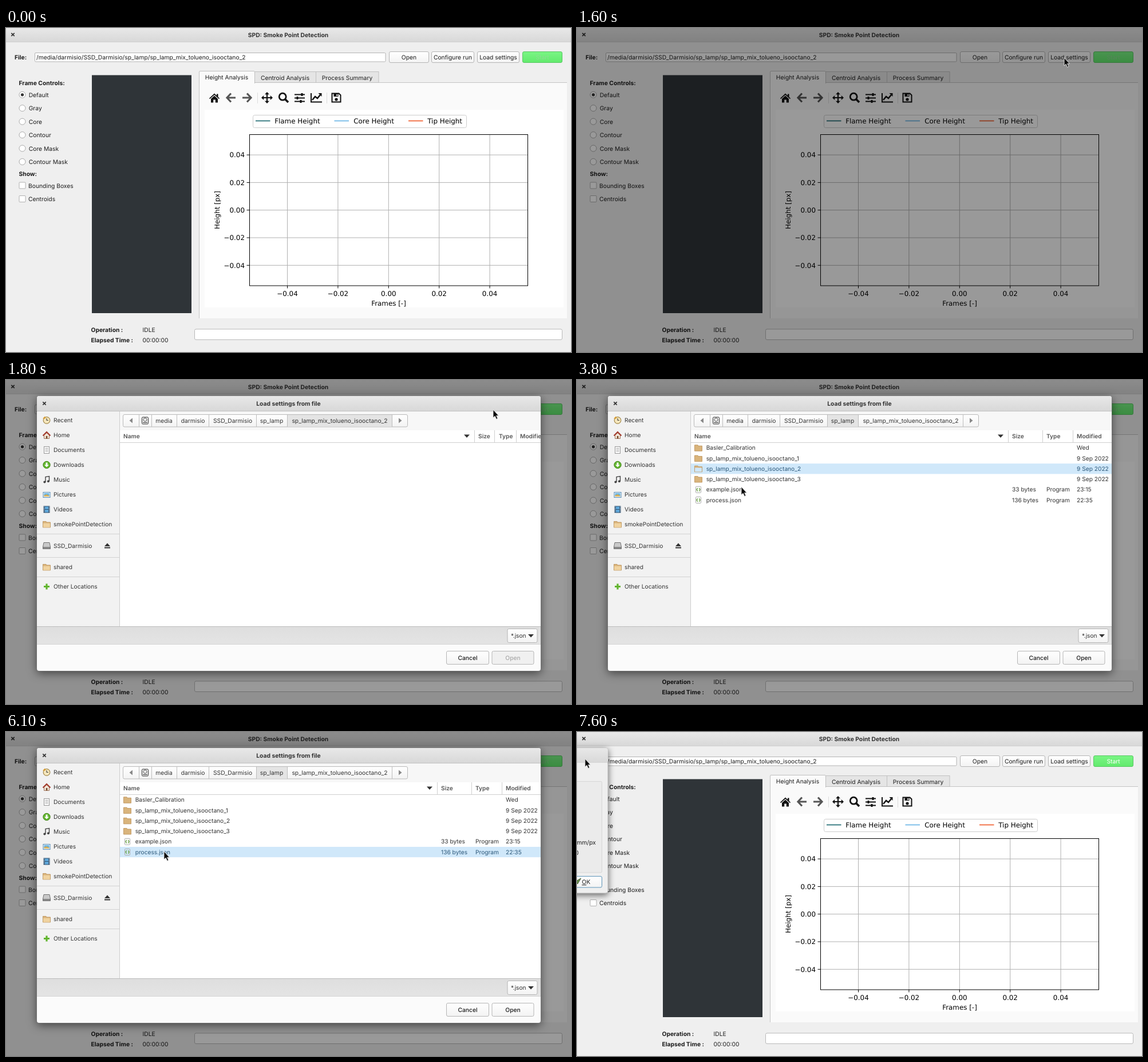
These frames come from a looping animation (987 px wide and 567 px high, 8000 ms). An HTML page:

```html
<!DOCTYPE html>
<html lang="en">
<head>
<meta charset="utf-8">
<title>SPD: Smoke Point Detection</title>
<style>
  html, body { margin: 0; width: 100%; height: 100%; overflow: hidden; background: #efefef; }
  svg { display: block; }
  text { font-family: Inter, sans-serif; white-space: pre; text-rendering: geometricPrecision; }
  .plot text { font-family: "DejaVu Sans", sans-serif; }
  .row rect { fill: none; }
  .row.sel rect { fill: #d0e8fa; }
  .row.sel text { fill: #2c587a; }
</style>
</head>
<body>
<svg id="stage" width="987" height="567" viewBox="0 0 987 567"></svg>
<script>
const LOOP = 8000, STEP = 100;
const INK = '#1c1c1c', SOFT = '#333';

// ---- drawing helpers (text y is the middle of the capitals) ----
const rect = (x, y, w, h, fill, stroke = 'none', r = 0, extra = '') =>
  `<rect x="${x}" y="${y}" width="${w}" height="${h}" rx="${r}" fill="${fill}" stroke="${stroke}" ${extra}/>`;
const path = (d, fill, stroke = 'none', width = 1, extra = '') =>
  `<path d="${d}" fill="${fill}" stroke="${stroke}" stroke-width="${width}" ${extra}/>`;
const line = (d, stroke, width = 1, extra = '') => path(d, 'none', stroke, width, extra);
const circle = (x, y, r, fill, stroke = 'none', width = 1) =>
  `<circle cx="${x}" cy="${y}" r="${r}" fill="${fill}" stroke="${stroke}" stroke-width="${width}"/>`;
const text = (s, x, y, { size = 10.3, weight = 400, fill = INK, anchor = 'start', extra = '' } = {}) =>
  `<text x="${x}" y="${y + size * .36}" font-size="${size}" font-weight="${weight}" fill="${fill}" text-anchor="${anchor}" ${extra}>${s}</text>`;
const bold = (s, x, y, opt) => text(s, x, y, { weight: 700, ...opt });
const group = (id, body, extra = '') => `<g id="${id}" ${extra}>${body}</g>`;
const at = (x, y, body) => `<g transform="translate(${x} ${y})">${body}</g>`;
const cross = (x, y) => line(`M${x - 2.7} ${y - 2.7}l5.4 5.4m0 -5.4l-5.4 5.4`, '#333', 1.7);
const button = (label, x, y, w, h, { id = '', fill = 'url(#face)', stroke = '#b5b5b5', ...opt } = {}) =>
  rect(x + .5, y + .5, w - 1, h - 1, fill, stroke, 2.5, id && `id="${id}"`) +
  text(label, x + w / 2, y + h / 2, { anchor: 'middle', ...opt });
const gradient = (id, from, to) =>
  `<linearGradient id="${id}" x2="0" y2="1"><stop stop-color="${from}"/><stop offset="1" stop-color="${to}"/></linearGradient>`;

// ---- main window ----
const toolIcons = () =>
  at(364, 122.5, path('M-9 .5L0-8L4-4.2V-7H6.5V-2L9 .5L8 1.8L0-5.5L-8 1.8Z', '#111') +
    path('M-6 1.5L0-4L6 1.5V8H1.8V3H-1.8V8H-6Z', '#111')) +
  at(393, 122, line('M8 0H-6M0-7.5L-7 0L0 7.5', '#555', 3.2)) +
  at(421, 122, line('M-8 0H6M0-7.5L7 0L0 7.5', '#555', 3.2)) +
  line('M439.5 113v19M560.5 113v19', '#dcdcdc') +
  at(456, 122, line('M-7 0H7M0-7V7', '#111', 2.2) +
    path('M0-10l4 4.2h-8ZM0 10l4-4.2h-8ZM-10 0l4.2-4v8ZM10 0l-4.2-4v8Z', '#111')) +
  at(484, 121, circle(-.8, -.8, 6, 'none', '#111', 2.8) + line('M3.5 3.5L9 9', '#111', 3.6)) +
  at(513, 122, line('M-9-5.5H9M-9 .5H9M-9 6.5H9', '#111', 1.8) +
    line('M4-8v5M-4-2v5M2 4v5', '#111', 3)) +
  at(542, 122, line('M-9-8V7.5H10', '#111', 2) + line('M-7 4L-2-2L2 1L7-5', '#111', 2.5) +
    path('M3.5-8H9.5V-2Z', '#111')) +
  at(577, 122, line('M-7.5-7.5H4.5L7.5-4.5V7.5H-7.5Z', '#111', 2) +
    path('M-4.5-7H3.5V-2H-4.5Z', '#111') + rect(.3, -6, 2, 3, '#fafafa') + circle(0, 3, 2.6, '#111'));

function plot() {
  const ticks = ['−0.04', '−0.02', '0.00', '0.02', '0.04'], size = 11.9;
  let s = rect(347, 143, 627, 346, '#fff') + rect(431.5, 152.5, 373, 22, '#fff', '#ccc', 3);
  [['Flame Height', 436, 470, '#1f6b72'], ['Core Height', 573.5, 608, '#6cb6e6'], ['Tip Height', 703, 737, '#f05f30']]
    .forEach(([name, x, tx, color]) => {
      s += line(`M${x} 162.5h25.5`, color, 1.7) + text(name, tx - .8, 162.5, { size, fill: '#000' });
    });
  ticks.forEach((label, i) => {
    const x = 491.5 + i * 88.4, y = 415.3 - i * 48.3;
    s += line(`M${x} 186V451M425 ${y}H912`, '#b0b0b0') + line(`M${x} 451v4.5M425 ${y}h-4.5`, '#000') +
      text(label, x, 464.5, { size, fill: '#000', anchor: 'middle' }) +
      text(label, 417, y, { size, fill: '#000', anchor: 'end' });
  });
  s += rect(425.5, 186.5, 486, 264.5, 'none', '#000') +
    text('Frames [-]', 668.5, 482, { size, fill: '#000', anchor: 'middle' }) +
    text('Height [px]', 0, 0, { size, fill: '#000', anchor: 'middle', extra: 'transform="translate(368.5 318.5) rotate(-90)"' });
  return `<g class="plot">${s}</g>`;
}

function mainWindow() {
  let s = rect(0, 0, 987, 567, '#efefef') + rect(0, 0, 987, 24, 'url(#bar)') + line('M0 24.5H987', '#d0d0d0') +
    cross(12, 11.5) + bold('SPD: Smoke Point Detection', 493, 12, { fill: '#333', anchor: 'middle' }) +
    bold('File:', 15, 51) + rect(50.5, 43.5, 612.5, 15.5, '#fff', '#b3b3b3', 1.5) +
    text('/media/darmisio/SSD_Darmisio/sp_lamp/sp_lamp_mix_tolueno_isooctano_2', 53, 51) +
    button('Open', 669, 41, 70, 20) + button('Configure run', 743, 41, 75, 20) +
    button('Load settings', 823, 41, 74, 20, { id: 'load' }) +
    button('Start', 902, 41, 70, 20, { fill: 'url(#green)', stroke: '#58c763', extra: 'id="start"' }) +
    rect(150, 82.5, 174, 416.5, '#2f3438') +
    bold('Frame Controls:', 22.5, 96.5) + bold('Show:', 22.5, 255.5);
  ['Default', 'Gray', 'Core', 'Contour', 'Core Mask', 'Contour Mask'].forEach((name, i) => {
    const y = 116.8 + i * 23.45;
    s += circle(28.5, y, 5.5, '#fff', '#a8a8a8') + text(name, 39.7, y + .3);
    if (!i) s += circle(28.5, y, 2.6, '#333');
  });
  ['Bounding Boxes', 'Centroids'].forEach((name, i) => {
    const y = 275.5 + i * 23.5;
    s += rect(23, y - 5.5, 11, 11, '#fff', '#b0b0b0', 1) + text(name, 39, y + .3);
  });
  s += rect(337.5, 95.5, 642.5, 412.5, '#fafafa') + line('M337.5 508V95.5H980', '#c4c4c4') +
    rect(434.5, 76.5, 107, 19, '#e5e5e5', '#c0c0c0') + rect(541.5, 76.5, 109.5, 19, '#e5e5e5', '#c0c0c0') +
    path('M337.5 97V77Q337.5 75.5 339 75.5H433Q434.5 75.5 434.5 77V97', '#fafafa', '#c0c0c0') +
    text('Height Analysis', 385.5, 86, { anchor: 'middle' }) +
    text('Centroid Analysis', 487.5, 87, { anchor: 'middle' }) +
    text('Process Summary', 596, 87, { anchor: 'middle' }) + toolIcons() + plot() +
    bold('Operation :', 148.5, 528) + text('IDLE', 238.5, 528) +
    bold('Elapsed Time :', 148.5, 546) + text('00:00:00', 238.5, 546) +
    rect(329.5, 527, 642, 18.5, '#fff', '#b8b8b8', 2.5);
  return s;
}

// ---- file dialog ----
const folder = path('M-6.5-5H-1L0-3.5H6.5V5.5H-6.5Z', '#d9b47c', '#b98f55', .8) + rect(-6, -1.8, 12, 7, '#f0d3a0');
const drive = path('M-5-5.5H5L6.5 2V5.5H-6.5V2Z', '#c9c9c9', '#666', .9) + rect(-6, 2, 12, 3.4, '#888');
const places = [
  ['Recent', 70.5, circle(0, 0, 5.8, '#f6e7bd', '#a58a4a', 1.2) + line('M0-3.5V0H3', '#444', 1.1) + path('M-7-3l4-4l1 4Z', '#d99a2b')],
  ['Home', 96.5, path('M-4.5 0V6H4.5V0L0-4Z', '#f1e6d8', '#8c5a3c', .8) + line('M-6.5 1L0-5.5L6.5 1', '#a3392b', 2) + rect(-1.2, 1.5, 2.6, 4.5, '#7a4a2c')],
  ['Documents', 122.5, rect(-4.5, -6, 9, 12, '#f7f7f7', '#999') + line('M-2.5-3h5M-2.5-.5h5M-2.5 2h5', '#aaa')],
  ['Downloads', 148.5, circle(0, 0, 6.2, '#62b52f', '#46881f') + path('M-1.5-4h3V0H4L0 4L-4 0H-1.5Z', '#fff')],
  ['Music', 174.5, line('M-2 4V-5L4.5-6V2.5', '#444', 1.4) + circle(-3.6, 4, 2, '#444') + circle(2.9, 2.8, 2, '#444')],
  ['Pictures', 200.5, rect(-6, -4, 12, 9, '#fff', '#4c86b4') + rect(-4.5, -2.5, 9, 6, '#64b0e0') + path('M-4.5 3.5V1L0-.5L4.5 2V3.5Z', '#d6b25e')],
  ['Videos', 226.5, rect(-5.5, -6, 11, 12, '#2d4f6e') + rect(-3, -5, 6, 4.5, '#5fa9dc') + rect(-3, .5, 6, 4.5, '#5fa9dc') + line('M-4.3-5V6M4.3-5V6', '#cfe0ee', 1.1, 'stroke-dasharray="1.3 1.3"')],
  ['smokePointDetection', 252.5, folder],
  ['SSD_Darmisio', 290, drive],
  ['shared', 327.5, folder],
  ['Other Locations', 361.5, line('M0-5V5M-5 0H5', '#62b52f', 3.2)],
];
const files = [
  ['Basler_Calibration', '', 'Wed'],
  ['sp_lamp_mix_tolueno_isooctano_1', '', '9 Sep 2022'],
  ['sp_lamp_mix_tolueno_isooctano_2', '', '9 Sep 2022'],
  ['sp_lamp_mix_tolueno_isooctano_3', '', '9 Sep 2022'],
  ['example.json', '33 bytes', '23:15'],
  ['process.json', '136 bytes', '22:35'],
];
const jsonIcon = rect(-4.5, -5.5, 9, 11, '#f6f6f6', '#a9a9a9', 1) +
  line('M-1-2.5Q-2.5-2.5-2.2-.8L-3 0L-2.2 .8Q-2.5 2.5-1 2.5M1-2.5Q2.5-2.5 2.2-.8L3 0L2.2 .8Q2.5 2.5 1 2.5', '#5d9a33', 1.2);
const down = (x, y) => path(`M${x - 5} ${y - 2.5}h10l-5 5.5Z`, '#333');

const header = (arrow, columns) =>
  down(arrow, 98) + columns.map(([name, edge, x]) =>
    line(`M${edge}.5 88V109`, '#cfcfcf') + text(name, x, 98.5, { size: 10.2, weight: 600, fill: '#555' })).join('');

const fileRow = ([name, bytes, when], i) => {
  const y = 118.8 + i * 18.25, opt = { size: 10.2, fill: SOFT };
  return `<g class="row">${rect(199, y - 9.1, 735, 18.25, 'none')}${at(212, y, bytes ? jsonIcon : folder)}` +
    text(name, 225.7, y, opt) + text(bytes, 760, y, opt) +
    text(bytes && 'Program', 820, y, opt) + text(when, 873, y, opt) + '</g>';
};

function dialog() {
  const opt = { size: 10.2, fill: SOFT };
  let s = rect(54, 28, 880, 481, '#fbfbfb', 'none', 4) +
    path('M54 54V32Q54 28 58 28H930Q934 28 934 32V54Z', 'url(#bar)') + line('M54 54.5H934', '#c2c2c2') +
    cross(67, 41) + bold('Load settings from file', 493.5, 41.5, { fill: '#333', anchor: 'middle' }) +
    rect(54, 55, 144, 376, '#f2f2f2') + line('M198.5 55V431', '#cdcdcd') +
    line('M54 269.5H198M54 310.5H198M54 344.5H198', '#d2d2d2') +
    path('M177 285.5l5 5.5h-10ZM172 292.5h10v2h-10Z', '#333');
  places.forEach(([name, y, icon]) => s += at(71, y, icon) + text(name, 83, y, opt));
  s += rect(199, 55, 735, 33, '#f7f7f7') + rect(204.5, 60.5, 497, 21.5, 'url(#face)', '#b9b9b9', 2.5) +
    rect(491, 61, 183.5, 20.5, '#e4e4e4', 'none', 0, 'id="crumbChild"') +
    rect(437, 61, 54, 20.5, '#e4e4e4', 'none', 0, 'id="crumbParent"') +
    [232, 254, 298, 354, 437, 491, 674].map(x => line(`M${x}.5 61V82`, '#bdbdbd')).join('') +
    path('M221 66.5v9l-5.5-4.5ZM686 66.5v9l5.5-4.5Z', '#888') +
    at(243, 71, rect(-5.5, -6, 11, 12, '#eee', '#333', 1.5) + circle(0, -1.5, 3, 'none', '#555') + line('M-4 3.5H4', '#333'));
  [['media', 276], ['darmisio', 326.5], ['SSD_Darmisio', 396], ['sp_lamp', 464], ['sp_lamp_mix_tolueno_isooctano_2', 583]]
    .forEach(([name, x]) => s += text(name, x, 71, { size: 10.3, fill: SOFT, anchor: 'middle' }));
  s += rect(199, 88, 735, 343, '#fff') + line('M199 109.5H934', '#cfcfcf') +
    text('Name', 205, 98.5, { size: 10.2, weight: 600, fill: '#555' }) +
    group('emptyList', header(805, [['Size', 818, 825], ['Type', 853, 861], ['Modified', 891, 898]])) +
    group('fullList', header(740, [['Size', 753, 760], ['Type', 813, 820], ['Modified', 866, 873]]) + files.map(fileRow).join('')) +
    rect(54, 431, 880, 31, 'url(#tray)') + line('M54 431.5H934', '#bcbcbc') + line('M54 462.5H934', '#d4d4d4') +
    rect(876, 435.5, 52, 24, 'url(#face)', '#b5b5b5', 2.5) + text('*.json', 882, 447.5, opt) + down(917, 447.5) +
    button('Cancel', 769, 474, 75, 24, { weight: 500, fill: 'url(#face)' }) +
    button('Open', 848.5, 474, 74, 24, { weight: 500, id: 'openFace', extra: 'id="openText"' });
  return rect(54, 28, 880, 481, '#ddd', '#777', 4, 'style="filter:drop-shadow(0 4px 8px #0008)"') +
    `<svg x="54" y="28" width="880" height="481" viewBox="54 28 880 481">${s}</svg>`;
}

// ---- settings message at the left edge ----
const message = () =>
  rect(-200, 28, 254, 254, '#efefef', '#bbb', 4, 'style="filter:drop-shadow(0 3px 6px #0009)"') +
  path('M-10 54V28H50Q54 28 54 32V54Z', 'url(#bar)') +
  rect(-200, 86.5, 243.5, 159.5, '#ebebeb', '#d6d6d6', 2) +
  text('mm/px', 33, 193.5, { anchor: 'end' }) + text('0', 3, 211.5, { anchor: 'end' }) +
  rect(-30, 252.5, 73.5, 19.5, 'url(#face)', '#5b93b8', 2.5) +
  path('M-3 262L1 266L7 256L3 258Z', '#6b8f4e', '#3c5330', .8) +
  text('<tspan text-decoration="underline">O</tspan>K', 8.5, 262.5);

const stage = document.getElementById('stage');
stage.innerHTML = `<defs>${gradient('bar', '#e8e8e8', '#d8d8d8')}${gradient('face', '#fff', '#f3f3f3')}` +
  `${gradient('tray', '#dedede', '#e4e4e4')}${gradient('green', '#7af584', '#62ea6d')}</defs>` +
  mainWindow() + group('dim', rect(0, 0, 987, 567, '#000')) + group('dialog', dialog()) + group('message', message()) +
  group('cursor', path('M0 0V14L3.2 11.2L5.6 16.5L8 15.4L5.6 10.4H9.6Z', '#0a0a0a', '#e8e8e8', .9));

// ---- timeline ----
const cursorKeys = [
  [300, 728, 498], [600, 785, 290], [800, 830, 140], [1000, 852, 62], [1200, 852, 62], [1400, 851, 52],
  [1900, 851, 52], [2400, 766, 76], [2500, 766, 76], [2900, 600, 200], [3200, 404, 130], [3400, 470, 66],
  [3600, 470, 66], [3800, 287, 187], [4200, 272, 201], [4500, 272, 201], [4600, 277, 197], [4800, 277, 197],
  [4900, 275, 198], [5000, 275, 198], [5200, 276, 209], [7000, 276, 209], [7100, 277, 222], [7600, 14, 47], [LOOP, 14, 47],
];
const $ = id => document.getElementById(id);
const show = (id, opacity) => $(id).setAttribute('opacity', +opacity);
const fill = (id, color) => $(id).setAttribute('fill', color);
const rows = document.querySelectorAll('.row');

function cursorAt(t) {
  const i = Math.max(1, cursorKeys.findIndex(key => key[0] > t));
  const [t0, x0, y0] = cursorKeys[i - 1], [t1, x1, y1] = cursorKeys[i];
  const k = (t - t0) / (t1 - t0);
  return `translate(${x0 + (x1 - x0) * k} ${y0 + (y1 - y0) * k})`;
}

function draw(t) {
  const listed = t >= 3500, chosen = t >= 6100 ? 5 : 2;
  show('cursor', t >= 300);
  $('cursor').setAttribute('transform', cursorAt(t));
  fill('load', t >= 1400 && t < 1600 ? '#d8d8d8' : 'url(#face)');
  fill('start', t >= 6700 ? '#fff' : '#8fdc95');
  show('dim', t < 1600 || t >= 6700 ? 0 : t < 6600 ? .4 : .2);
  show('dialog', t < 1700 || t >= 6700 ? 0 : t < 1800 || t >= 6600 ? .6 : 1);
  show('message', t < 6800 ? 0 : t < 6900 ? .6 : 1);
  show('emptyList', !listed);
  show('fullList', listed);
  show('crumbChild', !listed);
  show('crumbParent', listed ? 1 : t >= 3400 ? .4 : 0);
  fill('openFace', listed ? 'url(#face)' : '#f0f0f0');
  fill('openText', listed ? INK : '#a8a8a8');
  rows.forEach((row, i) => row.classList.toggle('sel', i === chosen));
}

function tick() {
  draw(Math.floor(performance.now() % LOOP / STEP) * STEP);
  requestAnimationFrame(tick);
}
tick();
</script>
</body>
</html>
```
